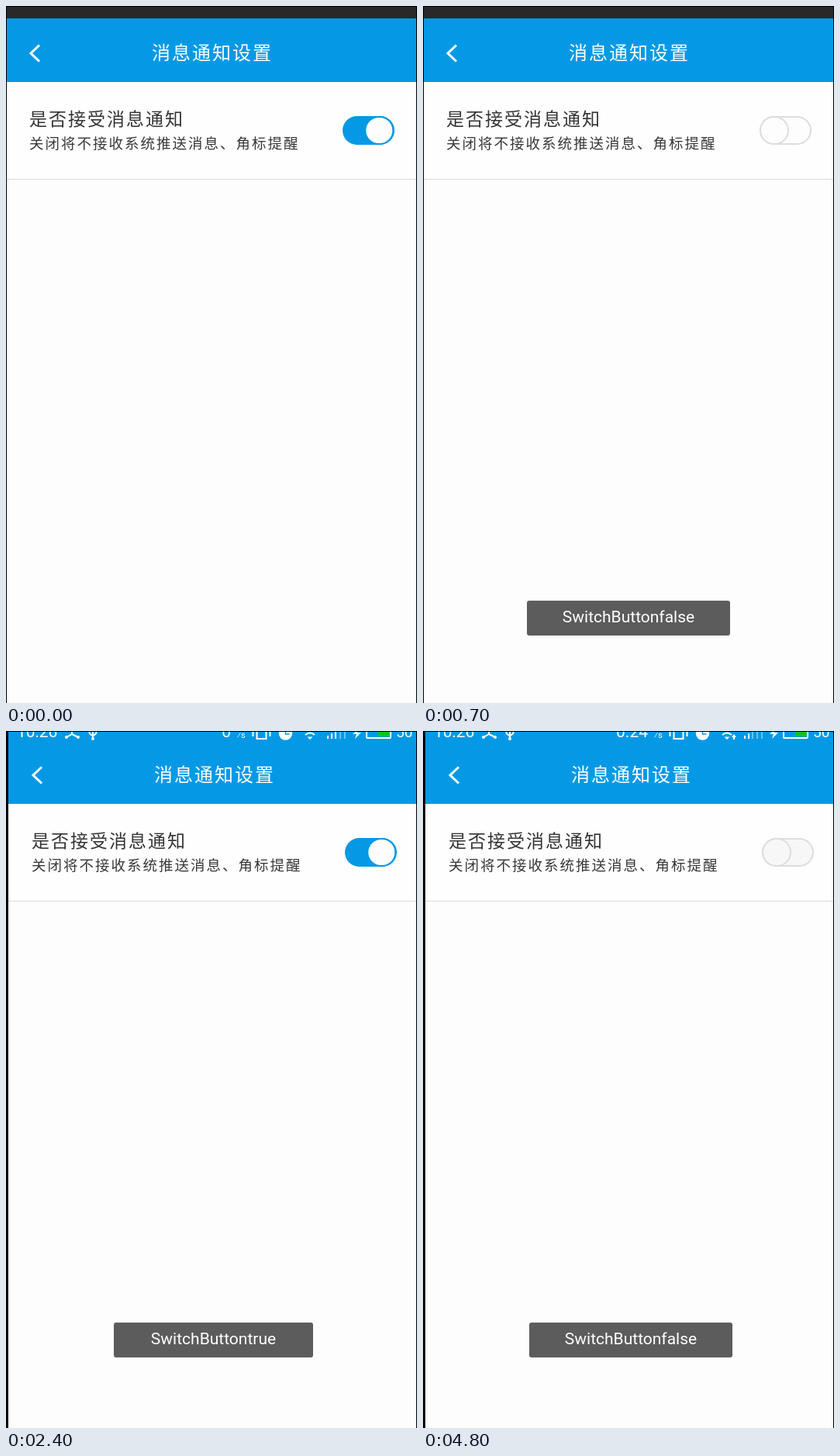
Animation of 530x899 px, one loop 5.3 s. Source, as an HTML page:

```html
<!DOCTYPE html>
<html lang="zh-CN">
<head>
<meta charset="utf-8">
<title>消息通知设置</title>
<style>
@property --on { syntax: "<number>"; inherits: true; initial-value: 1; }

html, body { margin: 0; width: 100%; height: 100%; overflow: hidden; background: #000; }
body { position: relative; font-family: "Noto Sans CJK SC", "Noto Sans CJK", sans-serif; }
div, svg, p { position: absolute; margin: 0; white-space: nowrap; }

/* All timelines share one clock and jump between states */
.screen, .switch, .toast, .dark, .s1, .s2 { animation: 5300ms step-end infinite; }

.screen { left: 0; top: 0; width: 530px; height: 910px; background: #fdfdfd; animation-name: shift; }
.edge { inset: 0; border: 1px solid #000; border-bottom: 0; }
.header { left: 0; top: 0; width: 100%; height: 98px; background: #0599e5; }
.item { left: 0; top: 98px; width: 100%; height: 125px; background: #fefefe; border-bottom: 1px solid #dadada; }
.status { left: 0; top: 0; }
.status text { font: 21px Roboto, sans-serif; fill: #fff; }
.status .unit { font-size: 11px; }
.status .charge { font-size: 19px; }
.dark { fill: #292929; animation-name: dark; }
.s1 { animation-name: first; }
.s2 { animation-name: second; }

.title { left: 188px; top: 43px; font-size: 24px; line-height: 32px; letter-spacing: 2px; color: #fff; }
.name { left: 30px; top: 128px; font-size: 23px; line-height: 32px; letter-spacing: 2px; color: #333; }
.note { left: 30px; top: 162px; font-size: 18.5px; line-height: 28px; letter-spacing: 2px; color: #383838; }

.switch {
  --tint: color-mix(in srgb, #0599e5 calc(var(--on) * 100%), #dddde0);
  left: 434.25px; top: 142px; width: 66.5px; height: 37px; border-radius: 18.5px;
  background: #fdfdfd;
  box-shadow: inset 0 0 0 calc(2px + 20px * var(--on)) var(--tint);
  animation-name: toggle;
}
.knob {
  box-sizing: border-box; left: 0; top: -.25px; width: 37.5px; height: 37.5px;
  border: 2px solid var(--tint); border-radius: 50%; background: inherit;
  transform: translateX(calc(28.25px * var(--on)));
}

.toast {
  top: 767px; height: 45px; border-radius: 3px; background: #5c5c5d; color: #fff;
  font: 21px/43px Roboto, sans-serif; text-align: center; opacity: 0;
}
.no { left: 134px; width: 262px; animation-name: no; }
.yes { left: 136px; width: 257px; animation-name: yes; }

@keyframes shift {
  0% { transform: none; }
  24.528%, 100% { transform: translate(3px, -4px); }
}
@keyframes dark {
  0%, 49.056% { opacity: 1; }
  18.867%, 71.698%, 100% { opacity: 0; }
}
@keyframes first {
  0% { opacity: 1; }
  49.056%, 100% { opacity: 0; }
}
@keyframes second {
  0% { opacity: 0; }
  49.056%, 100% { opacity: 1; }
}
@keyframes toggle {
  0% { --on: 1; background: #fdfdfd; }
  5.66% { --on: .96; }
  7.547% { --on: .5; }
  9.433% { --on: 0; }
  32.075% { --on: .05; }
  33.962% { --on: .45; }
  35.849% { --on: .92; }
  37.735% { --on: 1; background: #fdfdfd; }
  56.603% { --on: .97; }
  58.49% { --on: .5; }
  60.377%, 100% { --on: 0; background: #f7f7f8; }
}
@keyframes no {
  0% { opacity: 0; z-index: 0; }
  7.547% { opacity: .3; }
  9.433% { opacity: .59; }
  11.32% { opacity: .85; }
  13.207% { opacity: 1; }
  39.622% { opacity: .8; }
  41.509% { opacity: .5; }
  43.396% { opacity: .2; }
  45.283% { opacity: 0; }
  56.603% { z-index: 2; }
  71.698% { opacity: .3; }
  73.584% { opacity: .6; }
  75.471% { opacity: .85; }
  77.358%, 100% { opacity: 1; z-index: 2; }
}
@keyframes yes {
  0% { opacity: 0; z-index: 1; }
  37.735% { opacity: .25; }
  39.622% { opacity: .55; }
  41.509% { opacity: .8; }
  43.396% { opacity: 1; }
  73.584% { opacity: .8; }
  75.471% { opacity: .4; }
  77.358%, 100% { opacity: 0; z-index: 1; }
}
</style>
</head>
<body>
<div class="screen">
  <div class="header"></div>
  <div class="item"></div>

  <svg class="status" width="530" height="16" viewBox="3 -4 530 16" fill="none" stroke-width="2">
    <g fill="#fff">
      <text x="14" y="8">10:26</text>
      <text class="s1" x="290" y="8" text-anchor="end">0</text>
      <text class="s2" x="290" y="8" text-anchor="end">0.24</text>
      <text class="unit" x="298" y="9">⁄s</text>
      <circle cx="78" cy="8" r="2"/><circle cx="93" cy="8" r="2"/><circle cx="112" cy="10" r="2"/>
      <circle cx="360.5" cy="3" r="8.7"/>
      <path d="M388.500 7.500h7l-3.500 3.500z"/>
      <path d="M456-4L447 4h5l-2 6 8-8h-5z"/>
      <path d="M414 6h2v4h-2zM419 3h2v7h-2z"/>
      <path class="s1" d="M424 0h2v10h-2z"/>
      <path opacity=".4" d="M424 0h2v10h-2zM430-3h2v13h-2zM436-6h2v16h-2z"/>
      <path class="s2" d="M400 11V8h-2l3-4 3 4h-2v3z"/>
      <text class="charge" x="503" y="8">50</text>
    </g>
    <g stroke="#fff">
      <path d="M85-4V4l-7 4M85 4l8 4"/>
      <path d="M112-6V10M107.500-1v3q0 2 4.500 4M116.500-1v3q0 2-4.500 4"/>
      <path d="M323.500-6h12V10h-12zM318.500 1v6M340.500 1v6"/>
      <path d="M386 5q6-5 12 0"/>
      <rect x="465" y="-6" width="31" height="15" rx="1"/>
    </g>
    <path d="M360.500-2V4h5" stroke="#0599e5" stroke-width="1.500"/>
    <rect x="480" y="-5" width="15" height="12" fill="#10c414"/>
    <rect class="dark" x="3" y="-4" width="530" height="16"/>
  </svg>

  <svg style="left:26px;top:46px" width="22" height="30" fill="none" stroke="#fff" stroke-width="3">
    <path d="M17 4.500L6 15l11 10.500"/>
  </svg>
  <p class="title">消息通知设置</p>
  <p class="name">是否接受消息通知</p>
  <p class="note">关闭将不接收系统推送消息、角标提醒</p>
  <div class="switch"><div class="knob"></div></div>
  <div class="toast no">SwitchButtonfalse</div>
  <div class="toast yes">SwitchButtontrue</div>
</div>
<div class="edge"></div>
</body>
</html>
```
